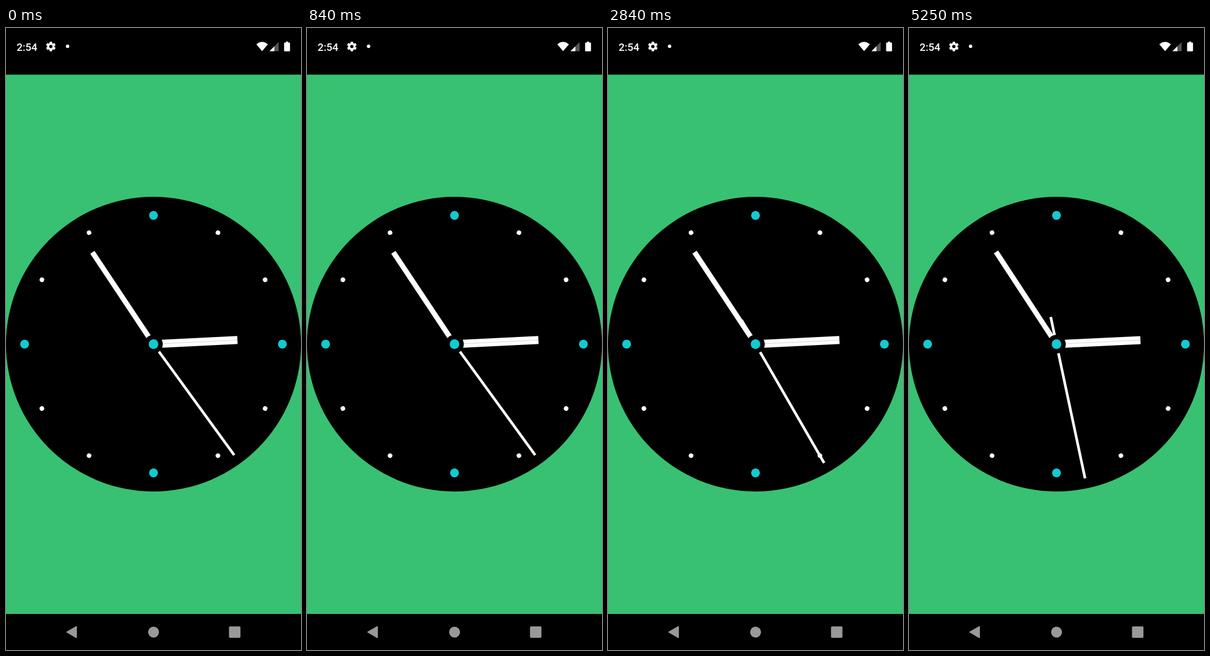
An HTML page for the animation above (5.42 s loop, 515 by 1087 pixels).

```html
<!DOCTYPE html>
<html lang="en">
<head>
<meta charset="utf-8">
<title>Clock</title>
<style>
  html, body { margin: 0; width: 100%; height: 100%; overflow: hidden; background: #000; }
  svg { display: block; width: 515px; height: 1087px; }
  text { font: 500 18.4px Roboto, sans-serif; }
</style>
</head>
<body>
<svg viewBox="0 0 515 1087">
  <rect y="81.5" width="515" height="942.5" fill="#38c172"/>

  <g fill="#fff">
    <text x="18.5" y="39.5">2:54</text>
    <g transform="translate(78.3 32.3)">
      <path id="tooth" d="M-2 -8.4H2L2.8 -4V4L2 8.4H-2L-2.8 4V-4Z"/>
      <use href="#tooth" transform="rotate(60)"/>
      <use href="#tooth" transform="rotate(120)"/>
      <circle r="6.2"/>
      <circle r="2.9" fill="#000"/>
    </g>
    <circle cx="107.5" cy="32" r="3"/>
    <path d="M437 28.5Q447 20 457.2 28.5L447.1 40.5Z"/>
    <path d="M476 24.5V40.5H460Z" fill="#555"/>
    <path d="M468.5 32V40.5H460Z"/>
    <path d="M488.6 23.8h4v1.7h2.2q1 0 1 1v13.2q0 1-1 1h-8.3q-1 0-1-1v-13.2q0-1 1-1h2.1z"/>
  </g>

  <g fill="#999">
    <path d="M106 1055.7L123 1046V1065.5Z" stroke="#999" stroke-width="1.5" stroke-linejoin="round"/>
    <circle cx="257.6" cy="1055.7" r="9.5"/>
    <rect x="389.3" y="1045.8" width="20" height="20" rx="2"/>
  </g>

  <g transform="translate(257.5 552.5)">
    <circle r="257.5"/>
    <g id="dots"></g>
    <g id="hour">
      <path d="M0 0V-146.7" stroke="#fff" stroke-width="14"/>
      <path d="M0 0V-146.7" stroke="#c4c4cc" stroke-width=".7"/>
    </g>
    <path id="minute" d="M0 0V-192.8" stroke="#fff" stroke-width="9"/>
    <path id="second" d="M0 48.5V-239.7" stroke="#fff" stroke-width="4.6"/>
    <circle r="16.2"/>
    <circle r="8.4" fill="#11cbd0"/>
  </g>
</svg>
<script>
const LOOP = 5420;
const START = (2 * 60 + 54) * 60 + 24;
const TICKS = [1880, 2960, 3880, 4920];
const byId = id => document.getElementById(id);

byId("dots").innerHTML = Array.from({ length: 12 }, (_, i) => {
  const quarter = i % 3 === 0;
  return `<circle cy="-225" r="${quarter ? 7.7 : 4}" fill="${quarter ? "#11cbd0" : "#fff"}" transform="rotate(${i * 30})"/>`;
}).join("");

// Turns a hand that needs `period` seconds for a full revolution.
const turn = (id, seconds, period) =>
  byId(id).setAttribute("transform", `rotate(${seconds % period / period * 360})`);

function draw() {
  const time = performance.now() % LOOP;
  const seconds = START + TICKS.filter(tick => time >= tick).length;
  turn("hour", seconds, 43200);
  turn("minute", seconds, 3600);
  turn("second", seconds, 60);
  requestAnimationFrame(draw);
}
draw();
</script>
</body>
</html>
```
